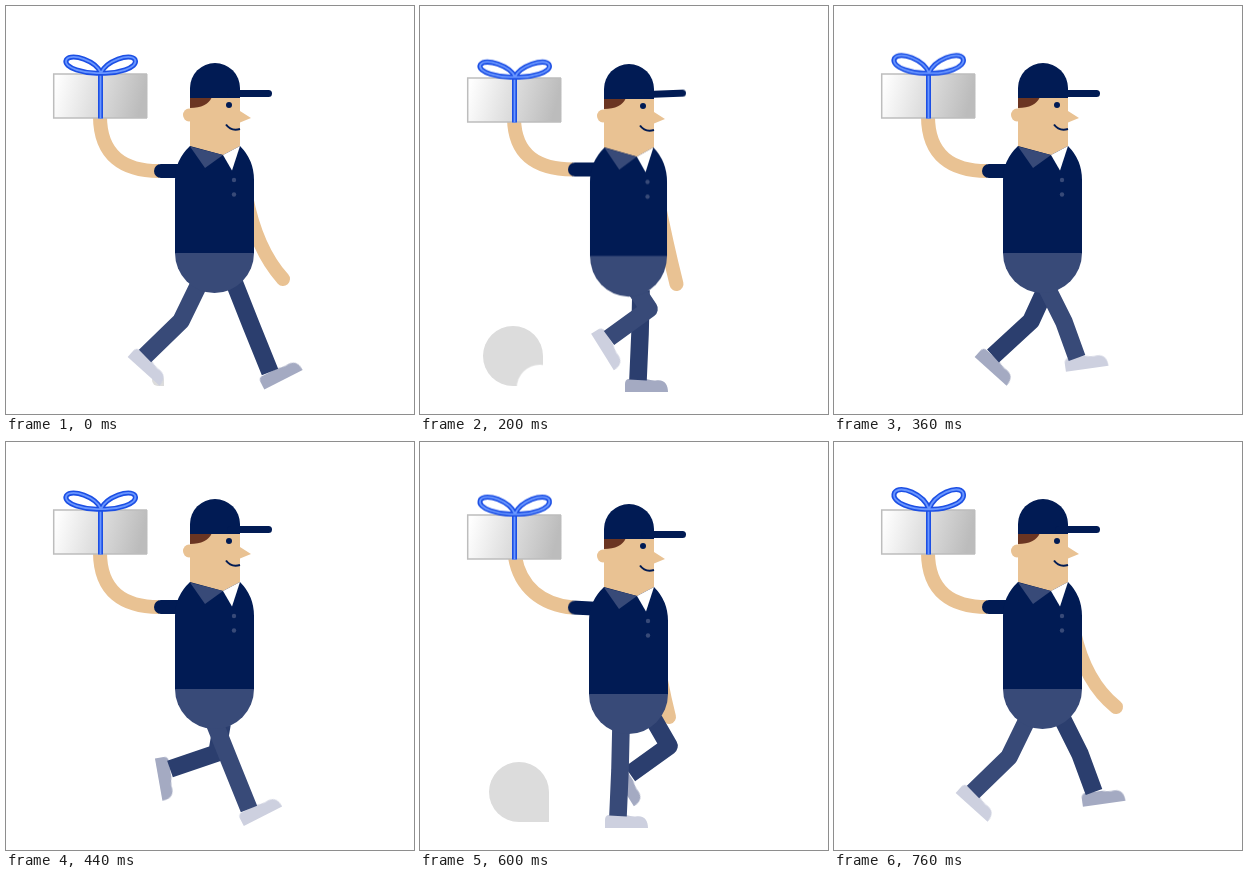
Write an HTML page without scripts that moves like this. It is 408 by 408 pixels and loops after 0.8 s.

```html
<!DOCTYPE html>
<html lang="en">
<head>
<meta charset="utf-8">
<title>Walking courier</title>
<style>
html, body { margin: 0; width: 100%; height: 100%; overflow: hidden; background: #fff; }
svg { display: block; width: 100vw; height: 100vh; }

/* Motion advances every 40 ms: two steps per 10% of the loop. */
.move { animation: 800ms steps(2) infinite; }

.navy { fill: #011b54; }
.near { fill: #384a78; }
.skin { fill: #e9c293; }
.limb { fill: none; stroke-width: 14; stroke-linecap: round; stroke: #e9c293; }
.leg { fill: none; stroke-width: 17.6; stroke-linejoin: round; }
.ribbon { fill: none; stroke: #1c4fe4; stroke-width: 5; stroke-linejoin: round; }
.shine { stroke: #6996ff; stroke-width: 1.8; }
.bow path { vector-effect: non-scaling-stroke; }

.body { animation-name: body; transform-origin: 208.5px 247px; }
.head { animation-name: head; }
.brim { animation-name: brim; transform-origin: 225px 88px; }
.box { animation-name: box; }
.bow { animation-name: bow; transform-origin: 95px 67px; }
.carry { animation-name: carry; stroke-linecap: butt; }
.sleeve { animation-name: sleeve; transform-origin: 153px 165px; stroke: #011b54; }
.swing { animation-name: swing; }
.near-leg { animation-name: near-leg; stroke: #384a78; }
.far-leg { animation-name: far-leg; stroke: #2b3e6e; }
.near-shoe { animation-name: near-shoe; fill: #cdd0df; }
.far-shoe { animation-name: far-shoe; fill: #a4aac2; }
.puff { animation-name: puff; fill: #dcdcdc; --seed: visible; }
.bite { animation-name: bite; transform-origin: 120px 382px; fill: #fff; }
.late .move { animation-delay: -360ms; --seed: hidden; }

@keyframes body {
  0%, 45%, 55%, 100% { transform: none; }
  10% { transform: translateY(9px) scale(1.05, .97); animation-timing-function: steps(3); }
  25% { transform: translateY(3px) scale(.975, 1.015); }
  35% { transform: translateY(1px) scale(.965, 1.025); }
  65% { transform: translateY(9px) scale(1.05, .97); }
  75% { transform: translateY(5px); }
  85% { transform: translateY(2px) scale(.975, 1.015); }
  95% { transform: none; animation-timing-function: steps(1); }
}
@keyframes head {
  0%, 45%, 55%, 100% { transform: none; }
  10% { transform: translateY(12px); animation-timing-function: steps(3); }
  25% { transform: translateY(1px); }
  35% { transform: translateY(-2px); }
  65% { transform: translateY(12px); }
  75% { transform: translateY(5px); }
  85% { transform: translateY(0); }
  95% { transform: none; animation-timing-function: steps(1); }
}
@keyframes brim {
  0%, 45%, 55%, 75%, 100% { transform: rotate(0); }
  10% { transform: rotate(8deg); animation-timing-function: steps(3); }
  25% { transform: rotate(-2deg); }
  35% { transform: rotate(-4deg); }
  65% { transform: rotate(8deg); }
  85% { transform: rotate(-3deg); }
  95% { transform: rotate(0); animation-timing-function: steps(1); }
}
@keyframes box {
  0%, 45%, 55%, 100% { transform: none; }
  10% { transform: translateY(8px); animation-timing-function: steps(3); }
  25% { transform: translateY(4px); }
  35% { transform: translateY(2px); }
  65% { transform: translateY(8px); }
  75% { transform: translateY(5px); }
  85% { transform: translateY(3px); }
  95% { transform: none; animation-timing-function: steps(1); }
}
@keyframes bow {
  0%, 55%, 100% { transform: scaleY(1); }
  10% { transform: scaleY(1.28); animation-timing-function: steps(3); }
  25% { transform: scaleY(.93); }
  35% { transform: scaleY(.83); }
  45% { transform: scaleY(1.1); }
  65% { transform: scaleY(1.28); }
  75% { transform: scaleY(1.06); }
  85% { transform: scaleY(.92); }
  95% { transform: scaleY(1.22); animation-timing-function: steps(1); }
}
@keyframes carry {
  0%, 45%, 55%, 100% { d: path("M153 165C118 165 94 150 94 110"); }
  10% { d: path("M153 169C126 164 104 144 96 118"); animation-timing-function: steps(3); }
  25% { d: path("M153 163.5C118 163 95 150 94 113"); }
  35% { d: path("M153 162C118 162 94 150 94 111"); }
  65% { d: path("M153 169C126 164 104 144 96 118"); }
  75% { d: path("M153 165.5C122 163 100 145 95 115"); }
  85% { d: path("M153 163C118 163 95 150 94 113"); }
  95% { d: path("M153 165C118 165 94 150 94 110"); animation-timing-function: steps(1); }
}
@keyframes sleeve {
  0%, 45%, 55%, 100% { transform: translateY(0) rotate(0); }
  10% { transform: translateY(4.5px) rotate(5deg); animation-timing-function: steps(3); }
  25% { transform: translateY(-1.5px) rotate(0); }
  35% { transform: translateY(-3px) rotate(0); }
  65% { transform: translateY(4.5px) rotate(5deg); }
  75% { transform: translateY(.5px) rotate(3deg); }
  85% { transform: translateY(-2px) rotate(0); }
  95% { transform: translateY(0) rotate(0); animation-timing-function: steps(1); }
}
@keyframes swing {
  0%, 100% { d: path("M240 190Q250 243 277 273"); }
  10% { d: path("M240 190Q257 236 273 276"); animation-timing-function: steps(3); }
  25% { d: path("M237 190Q246 236 256.5 278"); }
  35% { d: path("M234 190Q238 236 242 277"); }
  45% { d: path("M230 190Q226 236 226 270"); }
  55% { d: path("M228 190Q222 236 215 265"); }
  65% { d: path("M232 195Q230 240 228 268"); }
  75% { d: path("M234 195Q240 240 249 275"); }
  85% { d: path("M238 190Q250 240 269 272"); }
  95% { d: path("M240 190Q251 240 282 265"); animation-timing-function: steps(1); }
}
@keyframes near-leg {
  0%, 100% { d: path("M194 276L175 315L139 350"); }
  10% { d: path("M196 286L190 312L143 327"); animation-timing-function: steps(3); }
  25% { d: path("M215 282L229 303L189 332"); }
  35% { d: path("M214 280L231 308L228 354"); }
  45% { d: path("M212 280L230 316L243 352"); }
  55% { d: path("M208 280L224 320L243 367"); }
  65% { d: path("M207 286L214 328L222 371"); }
  75% { d: path("M201 284L200 328L198 374"); }
  85% { d: path("M196 280L184 322L172 366"); }
  95% { d: path("M194 276L175 315L139 350"); animation-timing-function: steps(1); }
}
@keyframes near-shoe {
  0%, 100% { transform: translate(140px, 350px) rotate(42deg); }
  10% { transform: translate(144px, 327px) rotate(80deg); animation-timing-function: steps(3); }
  25% { transform: translate(189px, 332px) rotate(58deg); }
  35% { transform: translate(228px, 353px) rotate(10deg); }
  45% { transform: translate(243px, 351px) rotate(-8deg); }
  55% { transform: translate(243.5px, 366.5px) rotate(-27deg); }
  65% { transform: translate(222px, 371px) rotate(-5deg); }
  75% { transform: translate(198px, 373px) rotate(0); }
  85% { transform: translate(172px, 365px) rotate(16deg); }
  95% { transform: translate(140px, 350px) rotate(42deg); animation-timing-function: steps(1); }
}
@keyframes far-leg {
  0%, 100% { d: path("M228 276L245 319L264 366"); }
  10% { d: path("M228 286L236 328L244 370"); animation-timing-function: steps(3); }
  25% { d: path("M221 284L220 328L218 374"); }
  35% { d: path("M215 280L203 322L191 366"); }
  45% { d: path("M214 278L197 315L159 350"); }
  55% { d: path("M216 282L211 311L164 327"); }
  65% { d: path("M228 286L232 307L187 333"); }
  75% { d: path("M234 278L249 304L210 332"); }
  85% { d: path("M231 276L250 308L247 353"); }
  95% { d: path("M228 276L246 312L260 350"); animation-timing-function: steps(1); }
}
@keyframes far-shoe {
  0%, 100% { transform: translate(264px, 366px) rotate(-27deg); }
  10% { transform: translate(244px, 370px) rotate(-7deg); animation-timing-function: steps(3); }
  25% { transform: translate(218px, 373px) rotate(0); }
  35% { transform: translate(193px, 365px) rotate(16deg); }
  45% { transform: translate(159px, 350px) rotate(42deg); }
  55% { transform: translate(164px, 327px) rotate(80deg); }
  65% { transform: translate(187px, 333px) rotate(70deg); }
  75% { transform: translate(209px, 332px) rotate(58deg); }
  85% { transform: translate(247px, 353px) rotate(10deg); }
  95% { transform: translate(260px, 350px) rotate(-8deg); animation-timing-function: steps(1); }
}
@keyframes puff {
  0% { transform: translate(158px, 380px) scale(.2); visibility: var(--seed); }
  10% { transform: translate(139px, 380px) scale(.77); visibility: visible; }
  20% { transform: translate(129px, 380px) scale(1); visibility: visible; animation-timing-function: steps(1); }
  25% { transform: translate(123px, 380px) scale(1); visibility: visible; }
  35%, 100% { transform: translate(115px, 380px) scale(1); visibility: hidden; }
}
@keyframes bite {
  0%, 20% { transform: scale(0); visibility: visible; animation-timing-function: steps(1); }
  25% { transform: scale(.31); visibility: visible; }
  35%, 100% { transform: scale(1); visibility: hidden; }
}
</style>
</head>
<body>
<svg viewBox="0 0 408 408">
  <defs>
    <linearGradient id="paper" x2="1" y2=".12">
      <stop offset=".05" stop-color="#fefefe"/>
      <stop offset="1" stop-color="#bcbcbc"/>
    </linearGradient>
    <path id="shoe" d="M-10 0H8Q14 2 19 1.300C27 .5 30 6 30 13H-13V5Q-13 1-10 0Z"/>
    <path id="cloud" d="M0 0H-30A30 30 0 1 1 0-30Z"/>
    <path id="loops" vector-effect="non-scaling-stroke" d="M95 67C90 55 66 46.500 60.500 53.500C56 62 80 68 95 67C100 55 124 46.500 129 53.500C133 62 110 68 95 67"/>
  </defs>

  <g>
    <use href="#cloud" class="move puff"/>
    <circle class="move bite" cx="120" cy="382" r="75"/>
  </g>
  <g class="late">
    <use href="#cloud" class="move puff"/>
    <circle class="move bite" cx="120" cy="382" r="75"/>
  </g>

  <path class="move limb swing"/>
  <use href="#shoe" class="move far-shoe"/>
  <path class="move leg far-leg"/>
  <use href="#shoe" class="move near-shoe"/>
  <path class="move leg near-leg"/>

  <g class="move head">
    <ellipse class="skin" cx="183" cy="109" rx="6" ry="6.500"/>
    <path class="skin" d="M184 90H234V105L245 112L234 116.500V143L218 152L184 144Z"/>
    <path fill="#6b3522" d="M184 91H206Q201 102 184 102Z"/>
    <path class="navy" d="M184 92V82A25 25 0 0 1 234 82V92Z"/>
    <path class="move brim" d="M225 87.500H262.500" stroke="#011b54" stroke-width="7" stroke-linecap="round"/>
    <circle class="navy" cx="223" cy="99" r="3"/>
    <path d="M220 118.500Q225 125.500 234 123" fill="none" stroke="#011b54" stroke-width="2"/>
  </g>

  <path class="move limb carry"/>
  <path class="move limb sleeve" d="M155 165H182"/>

  <g class="move body">
    <path class="navy" d="M184 140L217 149L234 140Q248 154 248 174V247.500H169V174Q169 154 184 140Z"/>
    <path class="near" d="M169 247H248A39.500 40 0 0 1 169 247Z"/>
    <path class="near" d="M184 140.500L217 149L199 162Z"/>
    <path fill="#fff" d="M217 149L234 140L226 164.500Z"/>
    <circle class="near" cx="228" cy="174" r="2.200"/>
    <circle class="near" cx="228" cy="188.500" r="2.200"/>
  </g>

  <g class="move box">
    <rect x="47.500" y="68" width="94" height="44" fill="url(#paper)"/>
    <path d="M141 68H47.700V112H141" fill="none" stroke="#bdbdbd" stroke-width="1.500"/>
    <path class="ribbon" d="M94.500 66V112.500"/>
    <path class="ribbon shine" d="M94.500 66V112.500"/>
    <g class="move bow">
      <use href="#loops" class="ribbon"/>
      <use href="#loops" class="ribbon shine"/>
    </g>
  </g>
</svg>
</body>
</html>
```
